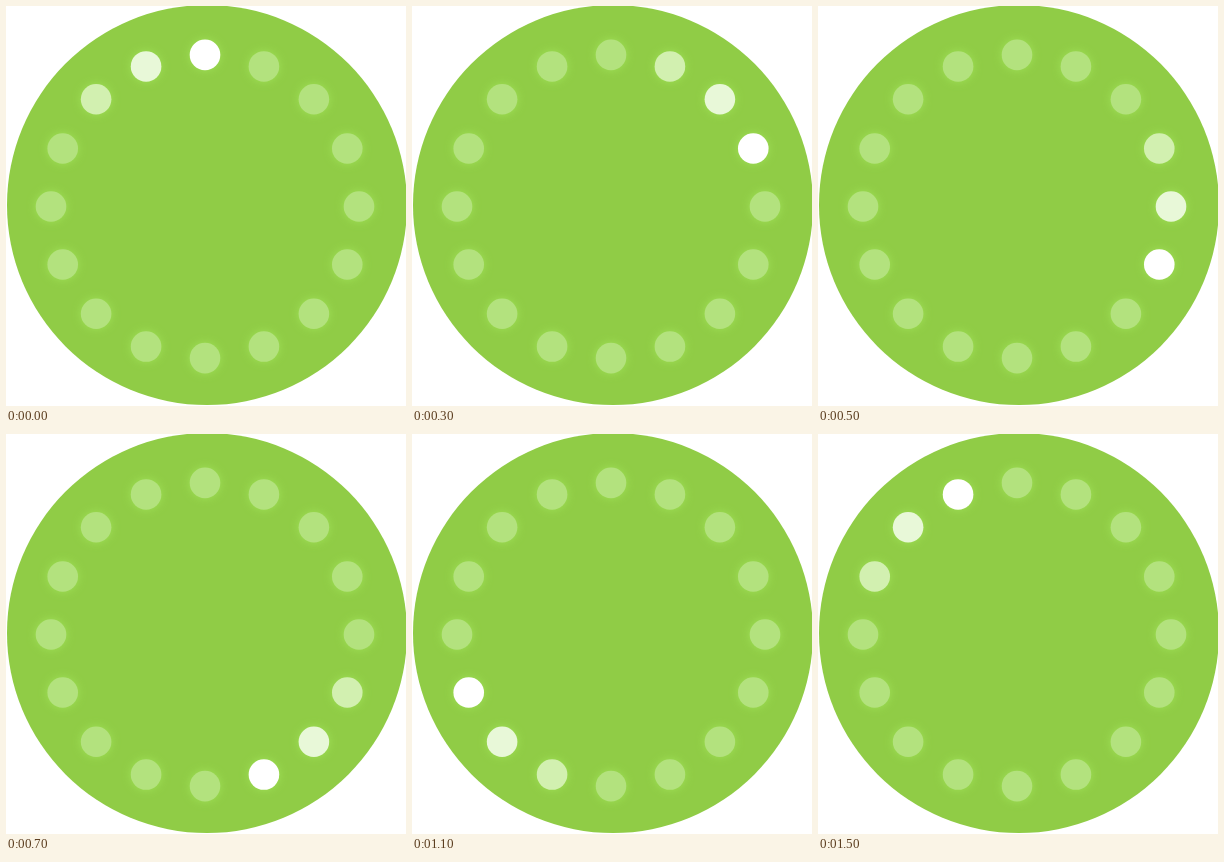
An HTML page with a canvas for the animation above (1600 ms loop, 400 px wide and 400 px high).

```html
<!DOCTYPE html>
<html lang="en">
<head>
<meta charset="utf-8">
<title>Dot spinner</title>
<style>
  html, body { margin: 0; width: 100%; height: 100%; overflow: hidden; background: #fff; }
  canvas { display: block; width: 400px; height: 400px; }
</style>
</head>
<body>
<canvas id="stage" width="400" height="400"></canvas>
<script>
const ctx = document.getElementById('stage').getContext('2d');
const COUNT = 16, STEP_MS = 100;
const TRAIL = ['#ffffff', '#e8f8d8', '#d2f0b0'];
const DIM = '#b3e27e';

function disc(x, y, r, fill) {
  ctx.fillStyle = fill;
  ctx.beginPath();
  ctx.arc(x, y, r, 0, 2 * Math.PI);
  ctx.fill();
}

function draw(time) {
  const head = Math.floor(time / STEP_MS) % COUNT;
  ctx.clearRect(0, 0, 400, 400);
  disc(201, 199, 200, '#90cc46');
  ctx.shadowColor = '#a0e158';
  ctx.shadowBlur = 9;
  for (let i = 0; i < COUNT; i++) {
    const angle = i / COUNT * 2 * Math.PI;
    const age = (head - i + COUNT) % COUNT;
    disc(199 + 154 * Math.sin(angle), 200.5 - 151.6 * Math.cos(angle), 15.3, TRAIL[age] || DIM);
  }
  ctx.shadowBlur = 0;
  ctx.shadowColor = 'transparent';
}

const start = performance.now();
function tick() {
  draw(performance.now() - start);
  requestAnimationFrame(tick);
}
tick();
</script>
</body>
</html>
```
